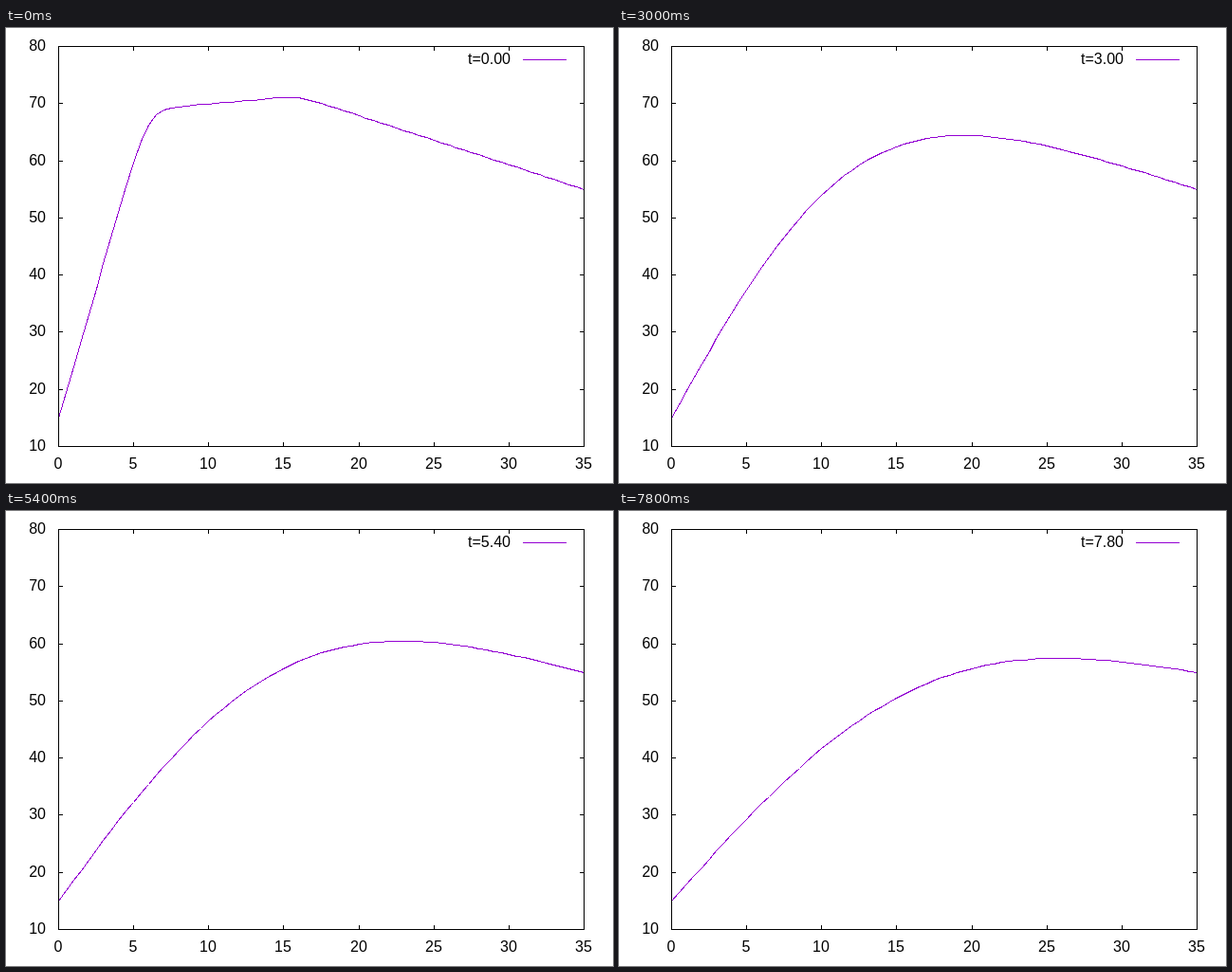
Write an HTML page that moves like this. It is 640x480 px and loops after 8000 ms.

```html
<!DOCTYPE html>
<html lang="en">
<head>
<meta charset="utf-8">
<title>Heat diffusion</title>
<style>
  html, body { margin: 0; width: 100%; height: 100%; overflow: hidden; background: #fff; }
  svg { display: block; width: 640px; height: 480px; }
  text { font: 16px "Liberation Sans", Arial, sans-serif; }
  path { fill: none; stroke: #000; stroke-width: 1; shape-rendering: crispEdges; }
  .curve { stroke: #9400d3; }
  .end { text-anchor: end; }
  .mid { text-anchor: middle; }
</style>
</head>
<body>
<svg viewBox="0 0 640 480">
  <g id="labels"></g>
  <text class="end" id="clock" x="532" y="38">t=0.00</text>
  <path class="curve" d="M545 33.5H591"/>
  <path class="curve" id="curve"/>
  <path id="axes"/>
</svg>
<script>
const LEFT = 55, RIGHT = 609, TOP = 19, BOTTOM = 441;
const LENGTH = 35, DIFFUSIVITY = 12, START = 0.026, MODES = 120;
const STEP = 200, FRAMES = 40, SPACING = 0.5;
const KINKS = [[6, 8.77], [16, 1.09]]; // position, drop in slope
const $ = id => document.getElementById(id);
const px = x => Math.round(LEFT + (RIGHT - LEFT) * x / LENGTH);
const py = u => Math.round(BOTTOM - (BOTTOM - TOP) * (u - 10) / 70);

function drawAxes() {
  let d = `M${LEFT + .5} ${TOP + .5}H${RIGHT + .5}V${BOTTOM + .5}H${LEFT + .5}Z`;
  let labels = '';
  for (let i = 0; i <= 7; i++) {
    const x = px(i * 5), y = py(10 + i * 10);
    d += `M${x + .5} ${TOP}v5M${x + .5} ${BOTTOM + 1}v-5`;
    d += `M${LEFT} ${y + .5}h5M${RIGHT + 1} ${y + .5}h-5`;
    labels += `<text class="mid" x="${x}" y="465">${i * 5}</text>`;
    labels += `<text class="end" x="42" y="${y + 5}">${10 + i * 10}</text>`;
  }
  $('axes').setAttribute('d', d);
  $('labels').innerHTML = labels;
}

// Sine series of the heat equation with both ends held at 15 and 55.
const modes = Array.from({ length: MODES }, (_, i) => {
  const k = (i + 1) * Math.PI / LENGTH;
  const load = KINKS.reduce((sum, [a, drop]) => sum + drop * Math.sin(k * a), 0);
  return { k, amp: 2 / LENGTH * load / (k * k) };
});

function temperature(x, t) {
  return modes.reduce((u, { k, amp }) =>
    u + amp * Math.sin(k * x) * Math.exp(-DIFFUSIVITY * k * k * (t + START)),
    15 + 40 * x / LENGTH);
}

let shown = -1;
function render(now) {
  const frame = Math.floor(now / STEP) % FRAMES;
  if (frame !== shown) {
    shown = frame;
    const t = frame * STEP / 1000, points = [];
    for (let x = 0; x <= LENGTH; x += SPACING)
      points.push(`${px(x) + .5} ${py(temperature(x, t)) + .5}`);
    $('curve').setAttribute('d', 'M' + points.join('L'));
    $('clock').textContent = 't=' + t.toFixed(2);
  }
  requestAnimationFrame(() => render(performance.now()));
}

drawAxes();
render(0);
</script>
</body>
</html>
```
